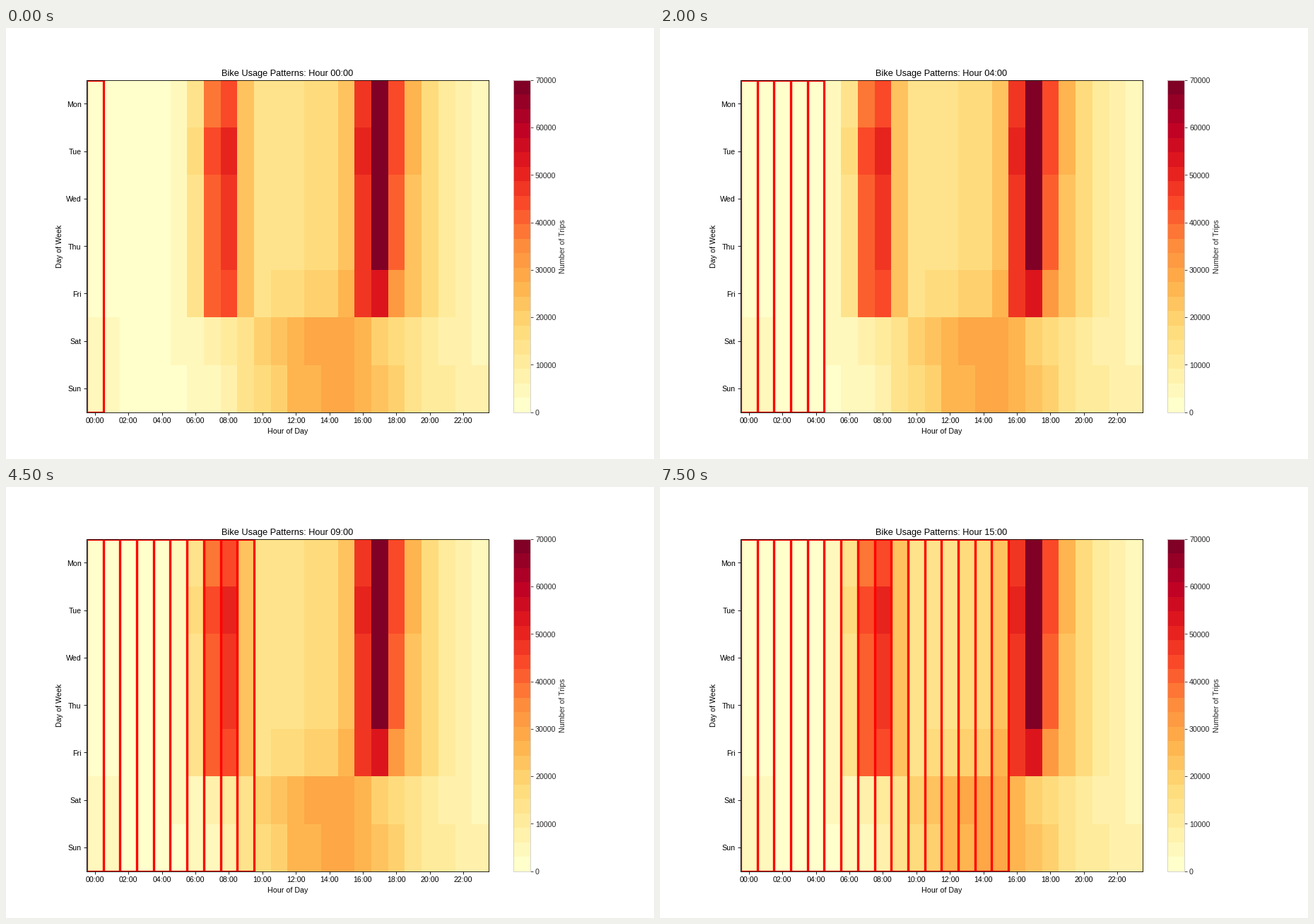
Animation, 917 px wide and 611 px high, one loop 8 s. Source, as a matplotlib script:

```python
import matplotlib.pyplot as plt
import numpy as np
from matplotlib.animation import FuncAnimation
from matplotlib.patches import Rectangle

plt.rcParams["font.family"] = "Liberation Sans"

W, H = 917, 611
DAYS = ["Mon", "Tue", "Wed", "Thu", "Fri", "Sat", "Sun"]
STEPS = 16
VMAX = 70000
GREY = "0.15"

hours = np.arange(24)


def bump(centre, width, height):
    return height * np.exp(-((hours - centre) / width) ** 2 / 2)


def weekday(morning, midday, evening, peak=16.85):
    """Two commuter peaks on a broad daytime swell, with an evening tail."""
    return (bump(7.56, 0.95, morning) + bump(14.5, 4.9, midday)
            + bump(peak, 0.82, evening) + bump(18.7, 1.6, 0.24 * evening))


def weekend(peak, height):
    """One afternoon swell plus some late-night riding."""
    return (bump(peak, 4.1, height) + bump(0.3, 1, 5)
            + bump(22.5, 1.5, 4))


trips = 1000 * np.array([
    weekday(40, 17, 50),
    weekday(48, 17, 51),
    weekday(44, 17, 49),
    weekday(43, 17, 49),
    weekday(40, 20, 35, peak=16.6),
    weekend(13.7, 29),
    weekend(14.3, 28.5),
])

fig, ax = plt.subplots(figsize=(12, 8), dpi=W / 12)
# Sub-pixel shift so edges snap to the intended pixel rows and columns
dx, dy = 0.6 / W, 0.8 / H
fig.subplots_adjust(left=0.125 - dx, right=0.9 - dx,
                    bottom=0.11 - dy, top=0.88 - dy)

image = ax.imshow(trips, cmap=plt.get_cmap("YlOrRd", 23), vmin=0, vmax=VMAX,
                  aspect="auto", interpolation="nearest")
ax.set_xticks(hours[::2], [f"{h:02d}:00" for h in hours[::2]])
ax.set_yticks(range(7), DAYS)
ax.set_xlabel("Hour of Day")
ax.set_ylabel("Day of Week")
title = ax.set_title("")

bar = fig.colorbar(image, ax=ax)
bar.set_label("Number of Trips", color=GREY)
bar.ax.tick_params(colors=GREY)
bar.outline.set_edgecolor("0.8")

boxes = [ax.add_patch(Rectangle((h - 0.5, -0.5), 1, 7, fill=False,
                                edgecolor="red", linewidth=3))
         for h in range(STEPS)]


def update(hour):
    title.set_text(f"Bike Usage Patterns: Hour {hour:02d}:00")
    for h, box in enumerate(boxes):
        box.set_visible(h <= hour)
    return [title, *boxes]


anim = FuncAnimation(fig, update, frames=STEPS, interval=500,
                     repeat=True, repeat_delay=0, blit=False)
plt.show()
```
